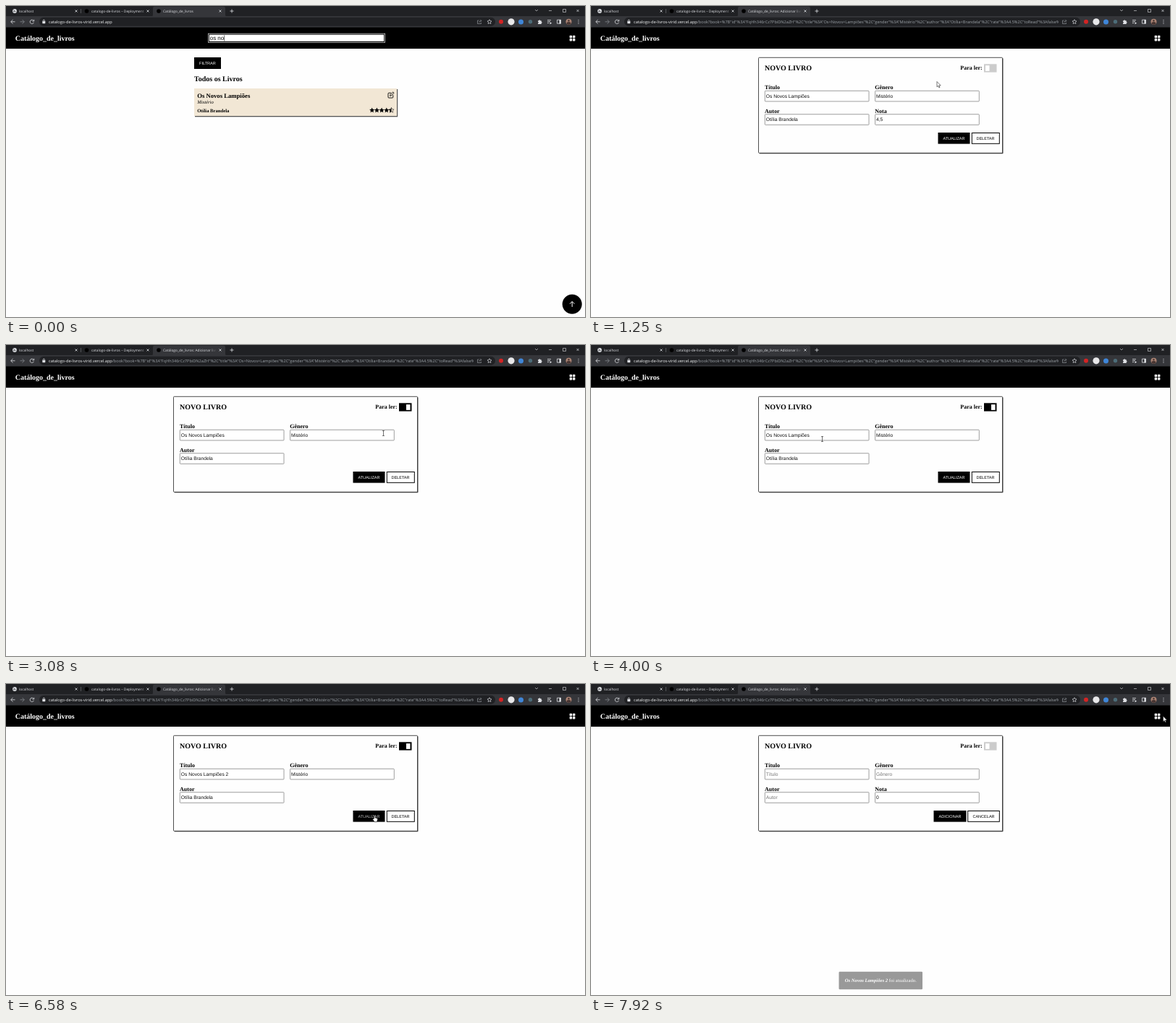
Write an HTML page that moves like this. It is 800 by 430 pixels and loops after 8000 ms.

```html
<!DOCTYPE html>
<html lang="pt">
<head>
<meta charset="utf-8">
<title>Catálogo_de_livros</title>
<style>
  html, body { margin: 0; width: 100%; height: 100%; overflow: hidden; background: #fefefe; }
  svg { display: block; width: 100vw; height: 100vh; }
  text { text-rendering: geometricPrecision; white-space: pre; }
  .ui { font-family: "Open Sans", sans-serif; }
  .tab { font-size: 4.85px; fill: #dfe1e5; }
  .url { font-size: 5.61px; fill: #9aa0a6; }
  .serif { font-family: "Liberation Serif", serif; font-weight: bold; font-size: 8px; }
  .h { font-size: 10px; }
  .sans { font-family: "Liberation Sans", sans-serif; font-size: 6.67px; fill: #111; }
  .btn { font-family: "Liberation Sans", sans-serif; font-size: 5.556px; text-anchor: middle; }
  .icon { fill: none; stroke: #dfe1e5; stroke-width: .8; }
  .dim { stroke: #85888d; }
  .field { fill: #fff; stroke: #767676; stroke-width: .7; }
  .caret { stroke: #000; stroke-width: .6; }
</style>
</head>
<body>
<svg viewBox="0 0 800 430">
  <defs>
    <clipPath id="tab2"><rect x="110" width="86" height="14"/></clipPath>
    <clipPath id="tab3"><rect x="210" width="81" height="14"/></clipPath>
    <clipPath id="address"><rect x="50" y="15" width="596" height="14"/></clipPath>
    <linearGradient id="tabFade"><stop stop-color="#202124" stop-opacity="0"/><stop offset="1" stop-color="#202124"/></linearGradient>
    <linearGradient id="activeFade"><stop stop-color="#35363a" stop-opacity="0"/><stop offset="1" stop-color="#35363a"/></linearGradient>
    <filter id="soft" x="-5%" y="-10%" width="110%" height="125%"><feGaussianBlur stdDeviation=".6"/></filter>
    <polygon id="star" points="0,-3.6 1.1,-1.3 3.5,-1 1.7,.7 2.2,3.2 0,2 -2.2,3.2 -1.7,.7 -3.5,-1 -1.1,-1.3"/>
    <path id="close" d="M-1.5-1.5 1.5 1.5M1.5-1.5-1.5 1.5"/>
  </defs>

  <!-- Browser window -->
  <rect width="800" height="14.5" fill="#202124"/>
  <path d="M201 14.5Q203 14.5 203 12V3Q203 .8 205.500 .8H300.500Q303 .8 303 3V12Q303 14.5 305 14.5Z" fill="#35363a"/>
  <rect y="14" width="800" height="16" fill="#35363a"/>
  <rect x="46" y="15.800" width="630" height="12" rx="6" fill="#202124"/>
  <g class="ui tab">
    <text x="18" y="8.800">localhost</text>
    <text x="118" y="8.800" clip-path="url(#tab2)">catalogo-de-livros – Deployment</text>
    <text id="tabTitle" x="217" y="8.800" clip-path="url(#tab3)"></text>
  </g>
  <rect x="184" y="3" width="12" height="8" fill="url(#tabFade)"/>
  <rect x="281" y="3" width="10" height="8" fill="url(#activeFade)"/>
  <circle cx="12" cy="7" r="2.900" fill="#dfe1e5"/>
  <path d="M10.500 5.500l1.500 1-.5 1.500-1.500-.5M12.500 8l1.300-.5" fill="none" stroke="#202124" stroke-width=".7"/>
  <circle cx="111.500" cy="7" r="2.800"/>
  <circle cx="211" cy="7" r="2.800"/>
  <g class="icon">
    <use href="#close" x="97" y="7"/><use href="#close" x="196" y="7"/><use href="#close" x="296" y="7"/>
    <path d="M309.500 7h5M312 4.500v5"/>
    <path class="dim" stroke-width=".5" d="M103.500 4v6"/>
    <path d="M731 5l2 2 2-2M750 6.500h4M769.500 4.500h4v4h-4z" stroke-width=".6"/>
    <use href="#close" x="790" y="6.500" stroke-width=".7"/>
    <path d="M12.500 21.800H6.800M9.500 19 6.700 21.800 9.500 24.600"/>
    <path class="dim" d="M19.500 21.800h5.700M22.500 19l2.800 2.800-2.800 2.800"/>
    <path d="M38.200 20.500A2.700 2.700 0 1 0 38.400 22.800M38.700 18.800v2.200h-2.300"/>
    <path d="M51.200 21v-.8a1.100 1.100 0 0 1 2.200 0v.8"/>
    <path class="dim" d="M653.500 20H651.500v4.500h5v-1.500M653.500 22.800q.3-2.300 3.200-2.300M655.300 18.800l1.700 1.700-1.700 1.600"/>
    <use href="#star" transform="translate(668 21.800) scale(.85)"/>
    <path d="M748 19.600h5M748 21.600h4M748 23.600h2"/>
    <path d="M761.500 19.200h5v5h-5z"/>
  </g>
  <g fill="#dfe1e5">
    <rect x="50.300" y="21" width="4" height="3.200" rx=".4"/>
    <path d="M751.500 22.300l2.700 1.500-2.700 1.500zM764.500 19h2v5.400h-2z"/>
    <path d="M735 20.200h1.300a.9.900 0 0 1 1.800 0h1.600v1.600a.9.900 0 0 1 0 1.800v1.400H735v-1.500a.8.800 0 0 0 0-1.700z"/>
    <circle cx="791" cy="19.500" r=".6"/><circle cx="791" cy="21.800" r=".6"/><circle cx="791" cy="24.100" r=".6"/>
  </g>
  <circle cx="684" cy="21.800" r="3" fill="#d32424"/>
  <circle cx="698" cy="21.800" r="4.600" fill="#e8e8ea"/>
  <circle cx="711.500" cy="22" r="3.500" fill="#3f86d8"/>
  <circle cx="724.500" cy="21.800" r="2.700" fill="#4c6c78"/>
  <circle cx="777.500" cy="21.800" r="4" fill="#a98273"/>
  <path d="M774.500 24.500a3 2.400 0 0 1 6 0 4 4 0 0 1-6 0M777.500 19a1.300 1.300 0 1 1-.01 0" fill="#463431"/>
  <g clip-path="url(#address)">
    <text class="ui url" x="59" y="23.800"><tspan fill="#f1f3f4">catalogo-de-livros-virid.vercel.app</tspan><tspan id="query"></tspan></text>
  </g>

  <!-- Site header -->
  <rect y="29.500" width="800" height="29.500"/>
  <text class="serif h" x="12.700" y="47.600" fill="#fff">Catálogo_de_livros</text>
  <g fill="#fff">
    <rect x="778.700" y="40.800" width="3.400" height="3.400" rx=".7"/><rect x="783" y="40.800" width="3.400" height="3.400" rx=".7"/>
    <rect x="778.700" y="45" width="3.400" height="3.400" rx=".7"/><rect x="783" y="45" width="3.400" height="3.400" rx=".7"/>
  </g>

  <!-- Book list -->
  <g id="list">
    <rect x="279" y="37.800" width="245" height="12.900" fill="#ddd"/>
    <rect x="280.300" y="39.100" width="242.400" height="10.300" fill="#fff" stroke="#000" stroke-width="1.100"/>
    <text class="sans" x="281.700" y="47" style="font-size:8px">os no</text>
    <path class="caret" d="M301.700 40.500v8"/>
    <rect x="260" y="71" width="37" height="16"/>
    <text class="btn" x="278.400" y="81" fill="#fff">FILTRAR</text>
    <text class="serif h" x="260" y="104">Todos os Livros</text>
    <rect x="261" y="115" width="280.200" height="38.300" fill="#555" filter="url(#soft)"/>
    <rect x="260" y="114" width="280" height="38" fill="#f2e7d5"/>
    <text class="serif" x="264.200" y="126.800" style="font-size:8.660px">Os Novos Lampiões</text>
    <text class="serif" x="264.200" y="135" style="font:italic 6.670px 'Liberation Serif',serif">Mistério</text>
    <text class="serif" x="264.200" y="146.500" style="font-size:6.670px">Otília Brandela</text>
    <path d="M532 120.200H529a1 1 0 0 0-1 1V126a1 1 0 0 0 1 1h4.800a1 1 0 0 0 1-1v-2.800M530.700 124.300l.3-1.800 3.200-3.200q.7-.5 1.300.2.600.7 0 1.300l-3.200 3.200z" fill="none" stroke="#000" stroke-width=".9"/>
    <use href="#star" x="505.700" y="144"/><use href="#star" x="512.400" y="144"/><use href="#star" x="519.100" y="144"/><use href="#star" x="525.800" y="144"/>
    <use href="#star" x="532.500" y="144" fill="none" stroke="#000" stroke-width=".5"/>
    <path d="M532.500 140.400v5.600l-2.200 1.200.5-2.500-1.800-1.700 2.400-.3z"/>
    <circle cx="782.200" cy="412.300" r="13.500"/>
    <path d="M782.200 416v-7.200M779 411.800l3.200-3.200 3.200 3.200" fill="none" stroke="#fff" stroke-width="1"/>
  </g>

  <!-- Book form -->
  <g id="form">
    <rect x="232.500" y="72" width="337" height="132.300" rx="1" fill="#444"/>
    <rect x="231.500" y="71.300" width="337" height="132" rx="1" fill="#fefefe" stroke="#222" stroke-width=".8"/>
    <text class="serif h" x="240" y="89">NOVO LIVRO</text>
    <text class="serif" x="510.300" y="88.400">Para ler:</text>
    <rect id="track" x="543" y="80.300" width="17.500" height="11.300"/>
    <rect id="knob" y="82.200" width="5.500" height="7.700" fill="#fff"/>
    <text class="serif" x="240" y="115.200">Título</text>
    <rect id="titleField" class="field" x="240.300" y="117.300" width="143.700" height="14.600" rx=".8"/>
    <text id="title" class="sans" x="241.800" y="126.900"></text>
    <path id="caret" class="caret" d="M0 120.500v8"/>
    <text class="serif" x="392.300" y="115.200">Gênero</text>
    <rect class="field" x="392.600" y="117.300" width="143.700" height="14.600" rx=".8"/>
    <text id="genre" class="sans" x="394" y="126.900"></text>
    <text class="serif" x="240" y="147.700">Autor</text>
    <rect class="field" x="240.300" y="149.700" width="143.700" height="14.600" rx=".8"/>
    <text id="author" class="sans" x="241.800" y="159.300"></text>
    <g id="rating">
      <text class="serif" x="392.300" y="147.700">Nota</text>
      <rect class="field" x="392.600" y="149.700" width="143.700" height="14.600" rx=".8"/>
      <text id="rate" class="sans" x="394" y="159.300"></text>
    </g>
    <g id="editButtons">
      <rect x="479.500" y="175" width="44" height="15.600"/>
      <text id="update" class="btn" x="501.500" y="184.800">ATUALIZAR</text>
      <rect x="526.300" y="175.500" width="38" height="14.800" fill="#fff" stroke="#000"/>
      <text class="btn" x="545" y="184.800">DELETAR</text>
    </g>
    <g id="addButtons">
      <rect x="473.500" y="175" width="45" height="15.600"/>
      <text class="btn" x="496" y="184.800" fill="#fff">ADICIONAR</text>
      <rect x="520.700" y="175.500" width="43.600" height="14.800" fill="#fff" stroke="#000"/>
      <text class="btn" x="542.500" y="184.800">CANCELAR</text>
    </g>
  </g>

  <g id="toast">
    <rect x="342.500" y="397.700" width="115.500" height="24.500" rx="1.200" fill="#000" fill-opacity=".4"/>
    <text x="400.300" y="412" fill="#fff" text-anchor="middle" style="font:6.670px 'Liberation Serif',serif"><tspan font-weight="bold" font-style="italic">Os Novos Lampiões 2</tspan> foi atualizado.</text>
  </g>

  <g id="cursor">
    <path id="arrow" d="M0 0V7.300L1.700 5.800 2.900 8.500 4 8 2.900 5.400H5.200Z" fill="#fff" stroke="#222" stroke-width=".6"/>
    <path id="beam" d="M-1.500-3.400H1.500M0-3.400V3.400M-1.500 3.400H1.500" fill="none" stroke="#333" stroke-width=".7"/>
    <path id="hand" d="M-.8 4V.6a.7.700 0 0 1 1.500 0V3l2.500.7q.8.300.7 1.100L3.300 7.600Q3 8.700 2 8.700H.2Q-.6 8.500-1 7.600L-2.700 5.200q0-1 1-.8Z" fill="#fff" stroke="#222" stroke-width=".6"/>
  </g>
</svg>
<script>
const LOOP = 8000, OPEN = 920, TO_READ = 2830, FOCUS = 4170, TYPE = 5000, PRESS = 6500, SAVED = 6750;
const QUERY = '/book?book=%7B"id"%3A"FqHh346rCz7PbiDN2aZH"%2C"title"%3A"Os+Novos+Lampiões"%2C"gender"%3A"Mistério"%2C"author"%3A"Otília+Brandela"%2C"rate"%3A4.5%2C"toRead"%3Afalse%7D';

// Pointer path: time, x, y, shape from that time on
const PATH = [
  [80, 300, 46, 'beam'], [250, 330, 60, 'arrow'], [640, 526, 118, 'arrow'], [740, 531, 122, 'hand'],
  [OPEN, 531, 122, 'arrow'], [1250, 478, 104.5, 'arrow'], [1670, 474, 112, 'arrow'], [1900, 486, 141, 'arrow'],
  [2330, 541, 89, 'arrow'], [2500, 542, 87, 'arrow'], [2700, 546, 86, 'hand'], [2870, 546, 86, 'hand'],
  [3000, 526, 116, 'beam'], [3080, 521.5, 122, 'beam'], [3330, 500, 142, 'arrow'], [3600, 400, 150, 'arrow'],
  [3950, 325, 131, 'beam'], [4080, 309, 128, 'beam'], [5300, 309, 128, 'beam'], [5370, 350, 140, 'arrow'],
  [5620, 495, 180, 'hand'], [5920, 500, 182, 'hand'], [6170, 509.5, 182, 'hand'], [SAVED, 509.5, 182, 'hand'],
  [6800, 510, 190, 'arrow'], [6960, 516, 207, 'arrow'], [7170, 513.3, 196, 'arrow'], [7300, 520, 190, 'arrow'],
  [7780, 775, 54, 'arrow'], [7920, 790.6, 44.6, 'arrow'], [LOOP, 791, 44, 'arrow']
];

const $ = id => document.getElementById(id);
const show = (id, on) => $(id).style.display = on ? '' : 'none';
const smooth = (a, b, t) => { const p = Math.min(1, Math.max(0, (t - a) / (b - a))); return p * p * (3 - 2 * p); };

function fill(id, value, placeholder) {
  $(id).textContent = value || placeholder;
  $(id).style.fill = value ? '' : '#757575';
}

function movePointer(t) {
  const visible = t >= PATH[0][0] && !(t >= TYPE && t < 5300);
  show('cursor', visible);
  if (!visible) return;
  const next = PATH.findIndex(point => point[0] > t);
  const [t0, x0, y0, shape] = PATH[next - 1], [t1, x1, y1] = PATH[next];
  const p = smooth(t0, t1, t);
  $('cursor').setAttribute('transform', `translate(${x0 + (x1 - x0) * p} ${y0 + (y1 - y0) * p})`);
  for (const id of ['arrow', 'beam', 'hand']) show(id, id === shape);
}

function draw(t) {
  const opened = t >= OPEN, saved = t >= SAVED;
  const toRead = t >= TO_READ && !saved, focused = t >= FOCUS && t < PRESS;
  show('list', !opened);
  show('form', opened);
  $('tabTitle').textContent = 'Catálogo_de_livros' + (opened ? ': Adicionar livro' : '');
  $('query').textContent = opened ? QUERY : '';

  const typed = ' 2'.slice(0, t < TYPE ? 0 : t < TYPE + 170 ? 1 : 2);
  fill('title', saved ? '' : 'Os Novos Lampiões' + typed, 'Título');
  fill('genre', saved ? '' : 'Mistério', 'Gênero');
  fill('author', saved ? '' : 'Otília Brandela', 'Autor');
  fill('rate', saved ? '0' : '4,5');
  show('rating', !toRead);
  $('track').setAttribute('fill', toRead ? '#000' : '#ccc');
  $('knob').setAttribute('x', toRead ? 553 : 545);

  $('titleField').style.stroke = focused ? '#000' : '';
  $('titleField').style.strokeWidth = focused ? 1.2 : '';
  const blinkOn = t >= TYPE && t < 5670 || (t - FOCUS) % 830 < 415 || t > 4850 && t < TYPE;
  show('caret', focused && blinkOn);
  if (focused) $('caret').setAttribute('transform', `translate(${242.2 + $('title').getComputedTextLength()} 0)`);

  show('editButtons', !saved);
  show('addButtons', saved);
  $('update').setAttribute('fill', t >= PRESS ? '#bbb' : '#fff');
  $('toast').setAttribute('opacity', smooth(7130, 7900, t));
  movePointer(t);
}

function tick() {
  draw(performance.now() % LOOP);
  requestAnimationFrame(tick);
}
tick();
</script>
</body>
</html>
```
